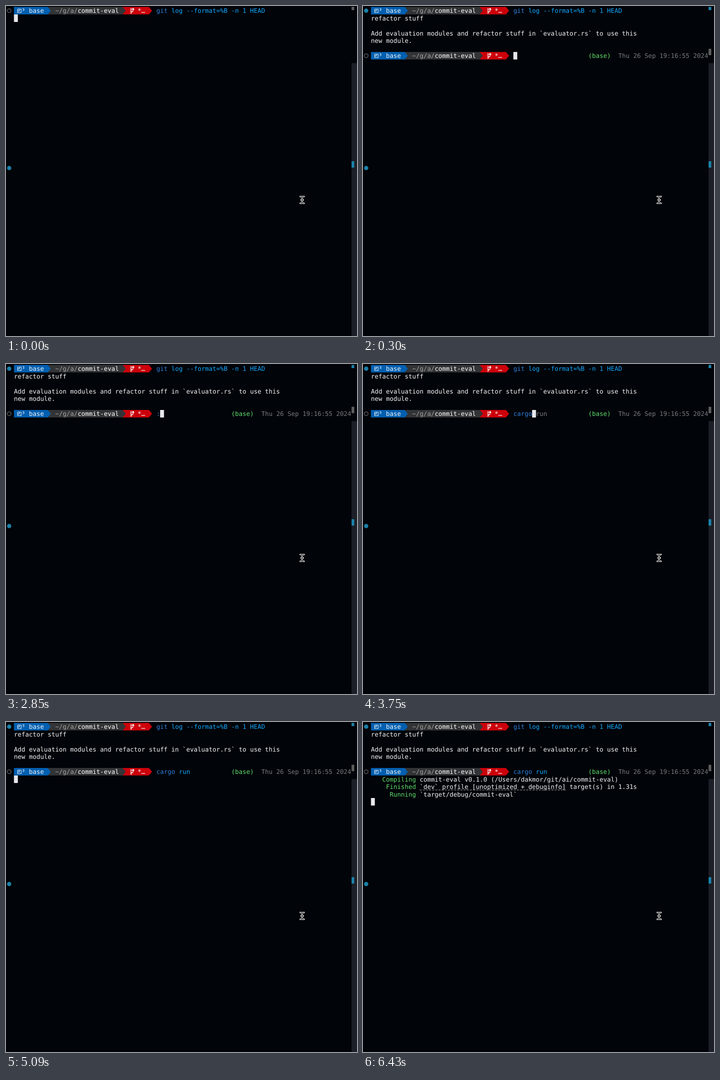
These frames come from a looping animation (772 by 725 pixels, 8000 ms). An HTML page:

```html
<!DOCTYPE html>
<html lang="en">
<head>
<meta charset="utf-8">
<title>Terminal</title>
<style>
  html, body { margin: 0; width: 100%; height: 100%; overflow: hidden; background: #010409; }
  svg { display: block; }
  text {
    font: 13.69px "DejaVu Sans Mono", "Noto Sans Mono", monospace;
    text-rendering: geometricPrecision;
    white-space: pre;
  }
</style>
</head>
<body>
<svg width="772" height="725" viewBox="0 0 772 725">
  <rect width="772" height="725" fill="#010409"/>
  <rect x="760" y="125.5" width="12" height="600" fill="#1c1f27"/>
  <rect x="760" y="341" width="6" height="14" fill="#1b81a8"/>
  <circle cx="7" cy="356" r="4.7" fill="#1b81a8"/>
  <g id="screen"></g>
  <g fill="none" stroke-linecap="square">
    <path id="beam" d="M647.5 418.5q3.8 0 3.8 3v9q0 3 -3.8 3M655.2 418.5q-3.9 0 -3.9 3v9q0 3 3.9 3M649.5 426h3.6" stroke="#e8e8e8" stroke-width="3.2"/>
    <use href="#beam"/>
    <path d="M647.5 418.5q3.8 0 3.8 3v9q0 3 -3.8 3M655.2 418.5q-3.9 0 -3.9 3v9q0 3 3.9 3M649.8 426h3" stroke="#000" stroke-width="1.1"/>
  </g>
</svg>
<script>
const CW = 8.243, LH = 16.5, LOOP = 8000;
const BG = '#010409', WHITE = '#f4f5f7', GREY = '#777a7d', BLUE = '#2f80dc', SKY = '#14a9ff',
  RED = '#f14c4c', GREEN = '#62de6c', CYAN = '#62d8e6', MARK = '#1b81a8', DIM = '#5c5c5c';
const screen = document.getElementById('screen');

const colX = c => 17.5 + c * CW;
const rowY = r => 2 + r * LH;
const rect = (x, y, w, h, fill) => `<rect x="${x}" y="${y}" width="${w}" height="${h}" fill="${fill}"/>`;
const text = (row, col, str, fill = WHITE, bold = false) =>
  `<text x="${colX(col)}" y="${rowY(row) + 13}" fill="${fill}"${bold ? ' font-weight="700"' : ''}>${str}</text>`;

// One segment of the prompt, ending in an arrow tip
function segment(row, from, to, fill) {
  const y = rowY(row), x = colX(to);
  return `<path fill="${fill}" d="M${colX(from)} ${y}H${x}L${x + 7} ${y + 8.2}L${x} ${y + 16.4}H${colX(from)}z"/>`;
}

function prompt(row) {
  const y = rowY(row);
  return segment(row, 29, 36, '#cc000b') + segment(row, 9, 29, '#333436') + segment(row, 0, 9, '#005fb0') +
    `<path transform="translate(0 ${y})" fill="none" stroke="${WHITE}" stroke-width="1.1" d="M25.7 4.7h7.6v7.8h-7.6zM29.5 4.7v3.9h-3.8"/>` +
    `<path transform="translate(0 ${y})" fill="none" stroke="#fff" stroke-width="1.6" d="M275 2.5v12.5M275 11.5q4.5-1 4.5-4v-3.5M277.2 6l2.3-3 2.3 3"/>` +
    text(row, 2, '³') + text(row, 4, 'base') +
    text(row, 11, '~/g/a/', '#a3a3a3') + text(row, 17, 'commit-eval', '#fff', true) +
    text(row, 33, '*…', '#fff', true);
}

function dot(row, done) {
  const paint = done ? `r="4.7" fill="${MARK}"` : `r="4.2" fill="none" stroke="#6b6d70" stroke-width="1.3"`;
  return `<circle cx="7" cy="${rowY(row) + 8.3}" ${paint}/>`;
}

const cursor = (row, col, under = '') =>
  rect(colX(col), rowY(row), CW + .3, LH, '#e6e8ee') + text(row, col, under, BG);

// Typed part of the command line, followed by the greyed suggestion
function typed(str, color, hint = '') {
  const word = str.split(' ')[0], end = 38 + str.length;
  return text(6, 38, word, color) + text(6, 39 + word.length, str.slice(word.length + 1), SKY) +
    text(6, end + 1, hint.slice(1).trimStart(), GREY) + cursor(6, end, hint[0]);
}

function base(done) {
  return dot(0, done) + rect(760, 2, 6, 7, done ? MARK : DIM) + prompt(0) +
    text(0, 38, 'git', BLUE) + text(0, 42, 'log --format=%B -n 1 HEAD', SKY);
}

const output = base(true) + text(1, 0, 'refactor stuff') +
  text(3, 0, 'Add evaluation modules and refactor stuff in `evaluator.rs` to use this') +
  text(4, 0, 'new module.');
const ready = output + dot(6, false) + rect(760, 94, 6, 14, DIM) + prompt(6) +
  text(6, 58, '(base)', GREEN) + text(6, 66, 'Thu 26 Sep 19:16:55 2024', GREY);
const entered = ready + text(6, 38, 'cargo', BLUE) + text(6, 44, 'run', SKY);
const compiling = entered + text(7, 3, 'Compiling', GREEN, true) +
  text(7, 13, 'commit-eval v0.1.0 (/Users/dakmor/git/ai/commit-eval)');
const building = job => compiling + cursor(8, 0) + text(8, 4, 'Building', CYAN, true) +
  text(8, 13, `[${'='.repeat(23)}&gt; ] ${job}`);
const running = compiling + text(8, 4, 'Finished', GREEN, true) +
  text(8, 13, '`dev` profile [unoptimized + debuginfo] target(s) in 1.31s') +
  `<path d="M${colX(13)} 149.3H${colX(52)}" stroke="#b4b6b9" stroke-dasharray="4.6 2.3"/>` +
  text(9, 5, 'Running', GREEN, true) + text(9, 13, '`target/debug/commit-eval`') + cursor(10, 0);

const steps = [
  [0, base(false) + cursor(1, 0)],
  [150, output + cursor(6, 0)],
  [300, ready + typed('', BLUE)],
  [900, ready + typed(':', BLUE)],
  [1350, ready + typed(':q', RED)],
  [2850, ready + typed(':', BLUE)],
  [3000, ready + typed('', BLUE)],
  [3300, ready + typed('c', BLUE, 'argo run')],
  [3450, ready + typed('ca', RED, 'rgo run')],
  [3600, ready + typed('car', RED, 'go run')],
  [3750, ready + typed('cargo', BLUE, ' run')],
  [4350, ready + typed('cargo ', BLUE, 'run')],
  [4490, ready + typed('cargo r', BLUE, 'un')],
  [4640, ready + typed('cargo ru', BLUE, 'n')],
  [4790, ready + typed('cargo run', BLUE)],
  [5090, entered + cursor(7, 0)],
  [5380, building('195/197: commit-eval')],
  [5680, building('196/197: commit-eval(bin)')],
  [6430, running]
];

let shown;
const start = performance.now();
function draw() {
  const t = (performance.now() - start) % LOOP;
  const step = steps.findLast(s => s[0] <= t);
  if (step !== shown) {
    shown = step;
    screen.innerHTML = step[1];
  }
  requestAnimationFrame(draw);
}
draw();
</script>
</body>
</html>
```
